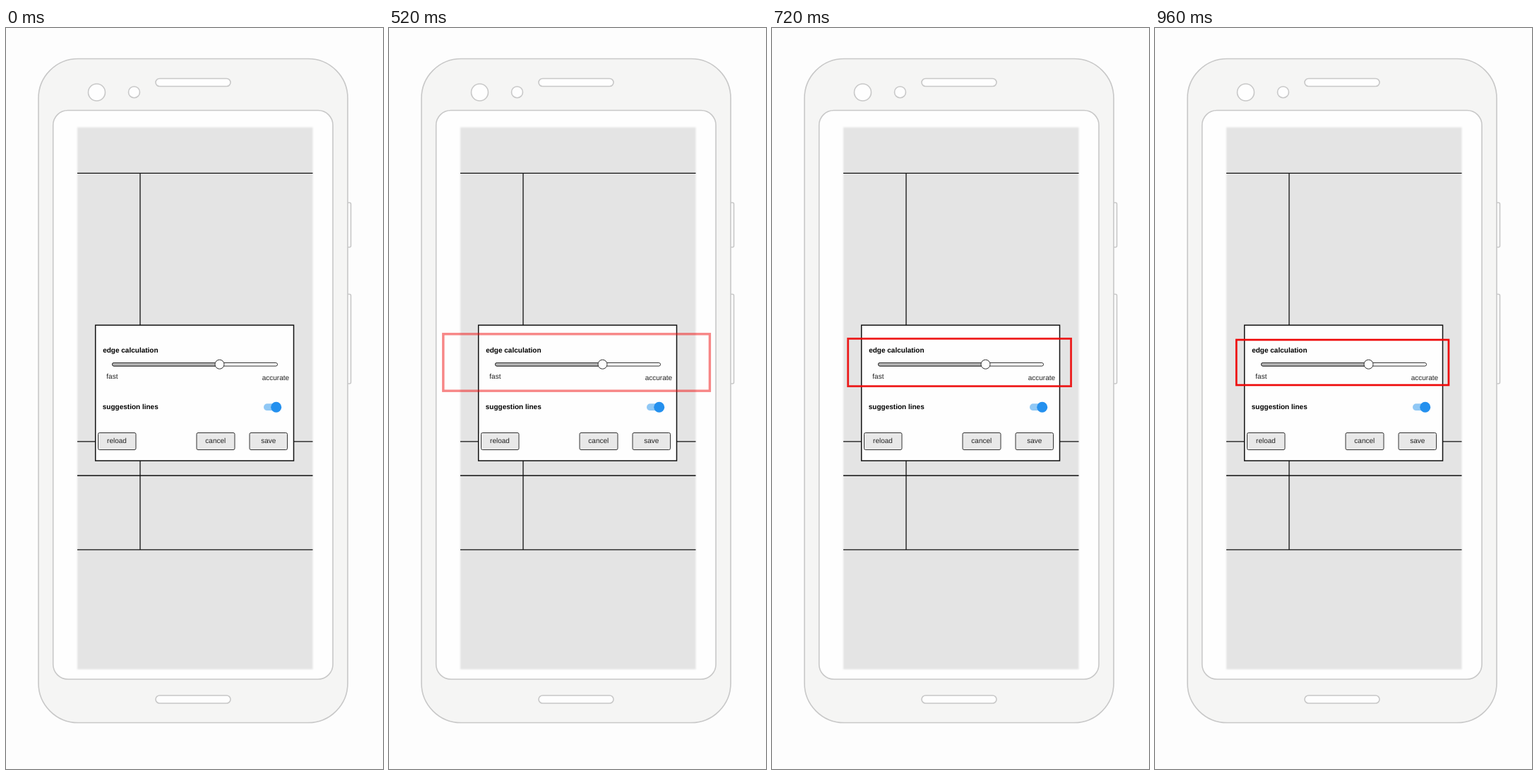
These frames come from a looping animation (534x1048 px, 1.84 s). An HTML page:

```html
<!DOCTYPE html>
<html lang="en">
<head>
<meta charset="utf-8">
<title>Settings dialog highlight</title>
<style>
  html, body { margin: 0; width: 100%; height: 100%; overflow: hidden; background: #fdfdfd; }
  svg { display: block; }
  text { font: 10px "Liberation Sans", Arial, sans-serif; fill: #222; text-rendering: geometricPrecision; }
  .bold { font-weight: bold; fill: #000; }
  .mid { text-anchor: middle; }
  .phone { stroke: #c8c8c8; stroke-width: 1.6; fill: #fefefe; }
  .button { fill: #e8e8e8; stroke: #333; }
</style>
</head>
<body>
<svg width="534" height="1048" viewBox="0 0 534 1048">
  <defs>
    <filter id="soft"><feGaussianBlur stdDeviation="0.8"/></filter>
  </defs>

  <g class="phone">
    <path d="M484 247h2.5q2 0 2 2v59q0 2-2 2H484M484 376.500h2.500q2 0 2 2v122.500q0 2-2 2H484"/>
    <rect x="46" y="43.500" width="438" height="939" rx="56" fill="#f5f5f4"/>
    <rect x="66.700" y="116.500" width="396.300" height="804.500" rx="21"/>
    <rect x="212" y="71.500" width="106" height="11" rx="5.500"/>
    <rect x="212" y="944" width="106" height="11" rx="5.500"/>
    <circle cx="128.500" cy="91" r="12"/>
    <circle cx="181.500" cy="90.700" r="8"/>
  </g>

  <rect x="101" y="140.500" width="333.500" height="766.500" fill="#e4e4e4" filter="url(#soft)"/>
  <path d="M101 205.400H434.500M101 584.800H434.500M101 633H434.500M101 737.900H434.500M190 206V738"
        stroke="#111" stroke-width="1.300"/>

  <rect x="126.700" y="420.300" width="280.800" height="191.700" fill="#fefefe" stroke="#111" stroke-width="1.500"/>
  <text class="bold" x="137.200" y="458.500">edge calculation</text>
  <g stroke="#333">
    <rect x="150.500" y="473.500" width="234" height="4.600" rx="2.300" fill="#fefefe"/>
    <rect x="150.500" y="473.500" width="152" height="4.600" rx="2.300" fill="#b4b4b4"/>
    <circle cx="302.500" cy="475.700" r="6.500" fill="#fefefe"/>
  </g>
  <text x="142.300" y="495.500">fast</text>
  <text x="362.700" y="497.700">accurate</text>

  <text class="bold" x="136.800" y="538.500">suggestion lines</text>
  <rect x="365" y="531.300" width="22" height="9.800" rx="4.900" fill="#90c8f5"/>
  <circle cx="382.700" cy="536.300" r="7.500" fill="#2490ee"/>

  <g class="button">
    <rect x="130.500" y="572.500" width="53.500" height="24" rx="2"/>
    <rect x="270" y="572.500" width="54" height="24" rx="2"/>
    <rect x="345" y="572.500" width="53.500" height="24" rx="2"/>
  </g>
  <g class="mid" stroke="none">
    <text x="157" y="587">reload</text>
    <text x="296.800" y="587">cancel</text>
    <text x="371.700" y="587">save</text>
  </g>

  <rect id="mark" x="-150.300" y="-32" width="300.600" height="64" fill="none"
        stroke="#ee0808" stroke-width="2.700" opacity="0"/>
</svg>
<script>
  const LOOP = 1840, STEP = 40, START = 400, LENGTH = 600, HOLD = 960;
  const mark = document.getElementById("mark");
  const origin = performance.now();

  // The outline shrinks from 1.5x and fades in with a cubic ease-out.
  function draw() {
    const time = (performance.now() - origin) % LOOP;
    const tick = Math.min(HOLD, Math.floor(time / STEP) * STEP);
    const p = Math.max(0, (tick - START) / LENGTH);
    const rest = (1 - p) ** 3;
    mark.setAttribute("opacity", 1 - rest);
    mark.setAttribute("transform", `translate(265.6 473) scale(${1 + rest / 2})`);
    requestAnimationFrame(draw);
  }
  draw();
</script>
</body>
</html>
```
